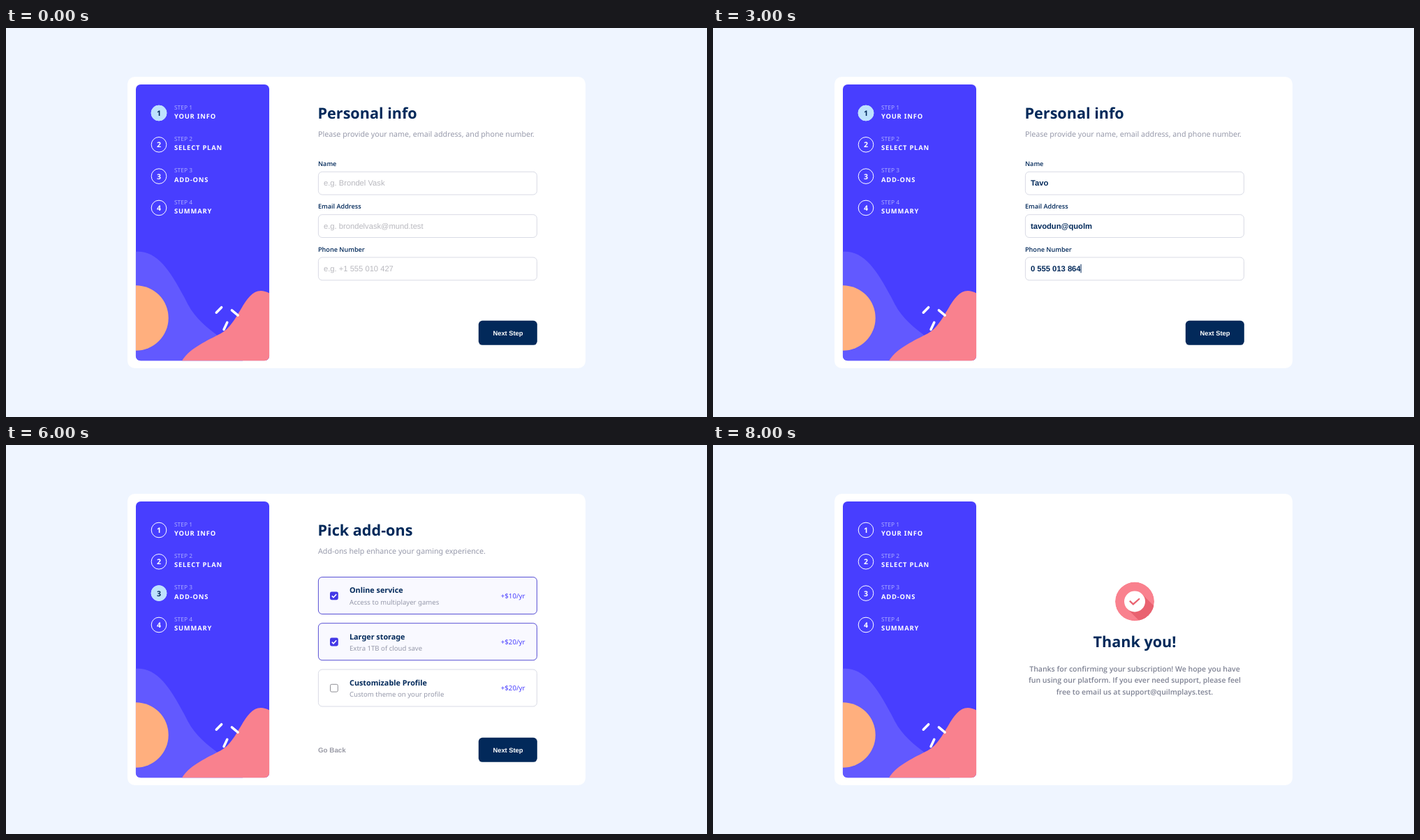
These frames come from a looping animation (1004x558 px, 9 s). An HTML page:

```html
<!DOCTYPE html>
<html lang="en">
<head>
<meta charset="utf-8">
<title>Multi-step form</title>
<style>
  :root {
    --navy: #02295a; --violet: #483eff; --gray: #9699aa;
    --line: #d9dbe5; --pale: #f9f9ff; --pink: #f9818e; --orange: #ffaf7e;
  }
  html, body { margin: 0; width: 100%; height: 100%; overflow: hidden; background: #eff5ff; }
  svg { display: block; width: 100%; height: 100%; }
  text {
    font-family: "Noto Sans", "Open Sans", sans-serif;
    fill: var(--navy); text-rendering: geometricPrecision; white-space: pre;
  }

  /* Each .show group is visible for 1 to 4 seconds from second --at */
  .show { visibility: hidden; animation: hold1 9s step-end calc((var(--at) - 9) * 1s) infinite; }
  .two { animation-name: hold2; }
  .three { animation-name: hold3; }
  .four { animation-name: hold4; }
  @keyframes hold1 { 0% { visibility: visible } 11.1111%, 100% { visibility: hidden } }
  @keyframes hold2 { 0% { visibility: visible } 22.2222%, 100% { visibility: hidden } }
  @keyframes hold3 { 0% { visibility: visible } 33.3333%, 100% { visibility: hidden } }
  @keyframes hold4 { 0% { visibility: visible } 44.4444%, 100% { visibility: hidden } }

  .title { font-size: 21.6px; font-weight: 700; }
  .lead { font-size: 10.7px; fill: var(--gray); }
  .label, .free, .thanks { font-family: "Open Sans", "Noto Sans", sans-serif; font-weight: 600; }
  .label { font-size: 9.1px; }
  .free { font-size: 8.75px; }
  .thanks { font-size: 10.5px; fill: #7f8394; }
  .name { font-size: 10.8px; font-weight: 600; }
  .note { font-size: 9.6px; fill: var(--gray); }
  .price { font-size: 9.7px; }
  .period { font-size: 9.6px; font-weight: 600; }
  .total { font-size: 12.4px; font-weight: 700; fill: var(--violet); }
  .field, .hint { font: 11.2px "Liberation Sans", Arial, sans-serif; }
  .field { font-weight: 700; }
  .hint { fill: #b8b8be; }
  .button { font: 700 9.33px "Liberation Sans", Arial, sans-serif; fill: #fff; }
  .back { font: 700 9.8px "Liberation Sans", Arial, sans-serif; fill: #9a9ba6; }
  .step { font-size: 8.4px; fill: #a9a9ff; }
  .caps { font-size: 9.4px; font-weight: 700; letter-spacing: .8px; fill: #fff; }
  .digit { font-size: 10.6px; font-weight: 700; fill: #fff; text-anchor: middle; }
  .active circle { fill: #bee2fd; }
  .active text { fill: var(--navy); }
  .end { text-anchor: end; }
  .mid { text-anchor: middle; }
  .gray { fill: var(--gray); }
  .violet { fill: var(--violet); }
  .box { fill: #fff; stroke: var(--line); }
  .picked { fill: var(--pale); stroke: var(--navy); }
  .checked { fill: var(--pale); stroke: #5850d4; }
  .caret { stroke: var(--navy); }
</style>
</head>
<body>
<svg viewBox="0 0 1004 558" preserveAspectRatio="none">
  <defs>
    <clipPath id="panel"><rect width="274" height="568" rx="10"/></clipPath>
    <clipPath id="badge"><circle cx="604" cy="224.5" r="28"/></clipPath>
    <rect id="input" x="447.4" y="206.3" width="313" height="32.8" rx="5.5"/>
    <rect id="tall" x="447.3" y="189.5" width="93" height="117.8" rx="5.5"/>
    <rect id="short" x="447.3" y="189.5" width="93" height="104" rx="5.5"/>
    <rect id="addon" x="447.4" y="189.5" width="313" height="53" rx="5.5"/>
    <g id="tick">
      <rect x="464" y="210.4" width="11.8" height="11.8" rx="2.4" fill="#4338e6"/>
      <path d="M466.8 216.4l2.2 2.3 4.2-4.6" fill="none" stroke="#fff" stroke-width="1.6"/>
    </g>
    <g id="icons" fill="#fff">
      <circle cx="470" cy="215" r="14" fill="var(--orange)"/>
      <rect x="465.2" y="214.3" width="9.6" height="7.8" rx="1"/>
      <path d="M470 210v8" stroke="var(--orange)" stroke-width="3.4"/>
      <path d="M470 210v7.6" stroke="#fff" stroke-width="1.6"/>
      <circle cx="470" cy="210.2" r="2.4"/>
      <circle cx="580" cy="215" r="14" fill="var(--pink)"/>
      <rect x="573" y="210.8" width="14" height="8.2" rx="4.1"/>
      <path d="M575 215h3.4M576.7 213.3v3.4M580 211v8" stroke="var(--pink)" stroke-width=".9"/>
      <circle cx="583.5" cy="215" r="1.7" fill="var(--pink)"/>
      <circle cx="690" cy="215" r="14" fill="var(--violet)"/>
      <path d="M685.6 209.8h8.8q1.8 0 2.2 2l.7 6q.1 2.4-1.6 2.4-1.2 0-3.6-3.2h-4.2q-2.4 3.2-3.6 3.2-1.7 0-1.6-2.4l.7-6q.4-2 2.2-2z"/>
      <path d="M685.4 213.3h3.4M687.1 211.6v3.4" stroke="var(--violet)" stroke-width=".9"/>
      <circle cx="693.2" cy="213.3" r="1.6" fill="var(--violet)"/>
    </g>
    <g id="plans">
      <text class="name" x="456" y="264.5">Arcade</text>
      <text class="name" x="566" y="264.5">Advanced</text>
      <text class="name" x="676" y="264.5">Pro</text>
    </g>
    <g id="toggle">
      <rect x="447" y="334" width="314" height="31.5" rx="4" fill="var(--pale)"/>
      <rect x="592" y="341" width="34" height="16.8" rx="8.4" fill="var(--navy)"/>
    </g>
    <g id="next">
      <rect x="676.8" y="419.8" width="84" height="35" rx="5.5" fill="var(--navy)"/>
      <text class="button mid" x="719" y="440.8">Next Step</text>
    </g>
  </defs>

  <rect x="174" y="70" width="656" height="418" rx="10.5" fill="#fff"/>

  <g transform="translate(185.9 80.9) scale(.698)" clip-path="url(#panel)">
    <rect width="274" height="568" fill="var(--violet)"/>
    <path d="M-17 347C38.6 330 68.6 377 107 452C146 527 255 540 212 612H-17Z" fill="#6259ff"/>
    <circle cy="480" r="67" fill="var(--orange)"/>
    <path d="M275 429.6C224 401.6 217.6 489.7 173.7 512.2C130 534.7 70.5 560.7 95.4 611H275Z" fill="var(--pink)"/>
    <path d="M165.3 469l10.6-10.8M209.5 474.6L197 464.1M187.6 489l-6.9 14.8" stroke="#fff" stroke-width="5" stroke-linecap="round"/>
  </g>

  <g fill="none" stroke="#fff">
    <circle cx="219" cy="122" r="10.8"/>
    <circle cx="219" cy="167.3" r="10.8"/>
    <circle cx="219" cy="212.6" r="10.8"/>
    <circle cx="219" cy="258" r="10.8"/>
  </g>
  <text class="digit" x="219" y="126">1</text>
  <text class="digit" x="219" y="171.3">2</text>
  <text class="digit" x="219" y="216.6">3</text>
  <text class="digit" x="219" y="262">4</text>
  <text class="step" x="241" y="116.5">STEP 1</text>
  <text class="caps" x="241" y="129.9">YOUR INFO</text>
  <text class="step" x="241" y="161.9">STEP 2</text>
  <text class="caps" x="241" y="175.2">SELECT PLAN</text>
  <text class="step" x="241" y="207.2">STEP 3</text>
  <text class="caps" x="241" y="220.5">ADD-ONS</text>
  <text class="step" x="241" y="252.6">STEP 4</text>
  <text class="caps" x="241" y="265.9">SUMMARY</text>

  <g class="active">
    <g class="show four" style="--at:0"><circle cx="219" cy="122" r="11.3"/><text class="digit" x="219" y="126">1</text></g>
    <g class="show two" style="--at:4"><circle cx="219" cy="167.3" r="11.3"/><text class="digit" x="219" y="171.3">2</text></g>
    <g class="show" style="--at:6"><circle cx="219" cy="212.6" r="11.3"/><text class="digit" x="219" y="216.6">3</text></g>
    <g class="show" style="--at:7"><circle cx="219" cy="258" r="11.3"/><text class="digit" x="219" y="262">4</text></g>
  </g>

  <!-- Personal info -->
  <g class="show four" style="--at:0">
    <text class="title" x="446.5" y="129.5">Personal info</text>
    <text class="lead" x="447" y="156.2">Please provide your name, email address, and phone number.</text>
    <text class="label" x="447" y="198">Name</text>
    <text class="label" x="447" y="259.4">Email Address</text>
    <text class="label" x="447" y="320.8">Phone Number</text>
    <use href="#input" class="box"/>
    <use href="#input" class="box" y="61.4"/>
    <use href="#input" class="box" y="122.7"/>
  </g>
  <text class="hint show" style="--at:0" x="455" y="226.3">e.g. Brondel Vask</text>
  <text class="hint show two" style="--at:0" x="455" y="287.6">e.g. brondelvask@mund.test</text>
  <text class="hint show three" style="--at:0" x="455" y="349">e.g. +1 555 010 427</text>
  <text class="field show three" style="--at:1" x="455" y="226.3">Tavo</text>
  <text class="field show two" style="--at:2" x="455" y="287.6">tavodun@quolm</text>
  <text class="field show" style="--at:3" x="455" y="349">0 555 013 864</text>
  <path class="caret show" style="--at:1" d="M482 216v12.5"/>
  <path class="caret show" style="--at:2" d="M543.5 277.4v12.5"/>
  <path class="caret show" style="--at:3" d="M527 338.8v12.5"/>

  <!-- Plan -->
  <g class="show two" style="--at:4">
    <text class="title" x="446.5" y="129.5">Select your plan</text>
    <text class="lead" x="447" y="156.2">You have the option of monthly or yearly billing.</text>
  </g>
  <g class="show" style="--at:4">
    <use href="#short" class="picked"/>
    <use href="#short" class="box" x="110"/>
    <use href="#short" class="box" x="220"/>
    <use href="#icons"/>
    <use href="#plans"/>
    <text class="price gray" x="456" y="278.5">$9/mo</text>
    <text class="price gray" x="566" y="278.5">$12/mo</text>
    <text class="price gray" x="676" y="278.5">$15/mo</text>
    <g transform="translate(0 -14)">
      <use href="#toggle"/>
      <circle cx="599.8" cy="349.4" r="5.8" fill="#fff"/>
      <text class="period" x="536" y="353">Monthly</text>
      <text class="period gray" x="642" y="353">Yearly</text>
    </g>
  </g>
  <g class="show" style="--at:5">
    <use href="#tall" class="picked"/>
    <use href="#tall" class="box" x="110"/>
    <use href="#tall" class="box" x="220"/>
    <use href="#icons"/>
    <use href="#plans"/>
    <text class="price gray" x="456" y="278.5">$90/yr</text>
    <text class="price gray" x="566" y="278.5">$120/yr</text>
    <text class="price gray" x="676" y="278.5">$150/yr</text>
    <text class="free" x="456" y="291.5">2 months free</text>
    <text class="free" x="566" y="291.5">2 months free</text>
    <text class="free" x="676" y="291.5">2 months free</text>
    <use href="#toggle"/>
    <circle cx="618.3" cy="349.4" r="5.8" fill="#fff"/>
    <text class="period gray" x="536" y="353">Monthly</text>
    <text class="period" x="642" y="353">Yearly</text>
  </g>

  <!-- Add-ons -->
  <g class="show" style="--at:6">
    <text class="title" x="446.5" y="129.5">Pick add-ons</text>
    <text class="lead" x="447" y="156.2">Add-ons help enhance your gaming experience.</text>
    <use href="#addon" class="checked"/>
    <use href="#addon" class="checked" y="66.2"/>
    <use href="#addon" class="box" y="132.5"/>
    <use href="#tick"/>
    <use href="#tick" y="66.2"/>
    <rect x="464.5" y="343.3" width="10.8" height="10.8" rx="2" fill="#fff" stroke="#8e8e94"/>
    <text class="name" x="492" y="212.3">Online service</text>
    <text class="note" x="492" y="229">Access to multiplayer games</text>
    <text class="price violet end" x="743.5" y="219.6">+$10/yr</text>
    <text class="name" x="492" y="278.5">Larger storage</text>
    <text class="note" x="492" y="295.2">Extra 1TB of cloud save</text>
    <text class="price violet end" x="743.5" y="285.8">+$20/yr</text>
    <text class="name" x="492" y="344.8">Customizable Profile</text>
    <text class="note" x="492" y="361.4">Custom theme on your profile</text>
    <text class="price violet end" x="743.5" y="352.1">+$20/yr</text>
  </g>

  <!-- Summary -->
  <g class="show" style="--at:7">
    <text class="title" x="446.5" y="129.5">Finishing up</text>
    <text class="lead" x="447" y="156.2">Double-check everything looks OK before confirming.</text>
    <rect x="447" y="189.5" width="314" height="128.5" rx="5.5" fill="var(--pale)"/>
    <text class="name" x="463.7" y="213.5">Arcade (Yearly)</text>
    <text class="note" x="463.7" y="226.2" text-decoration="underline">Change</text>
    <text class="name end" x="744" y="220">$90/yr</text>
    <path d="M464 245h280" stroke="#d6d8e2"/>
    <text class="note" x="463.7" y="271.5">Online service</text>
    <text class="price end" x="744" y="271.5">+$10/yr</text>
    <text class="note" x="463.7" y="299.4">Larger storage</text>
    <text class="price end" x="744" y="299.4">+$20/yr</text>
    <text class="note" x="463.7" y="337.7">Total (per year)</text>
    <text class="total end" x="744" y="338.5">$120/yr</text>
  </g>

  <!-- Thanks -->
  <g class="show" style="--at:8">
    <g clip-path="url(#badge)">
      <circle cx="604" cy="224.5" r="28" fill="var(--pink)"/>
      <path d="M614.6 213.9l40 40-21.2 21.2-40-40z" fill="#e96270"/>
    </g>
    <circle cx="604" cy="224.5" r="15" fill="#fff"/>
    <path d="M596.8 223.6l5 4.8 9.2-8.2" fill="none" stroke="#e96270" stroke-width="2.2"/>
    <text class="title mid" x="604" y="290">Thank you!</text>
    <text class="thanks mid" x="604" y="324.5">Thanks for confirming your subscription! We hope you have</text>
    <text class="thanks mid" x="604" y="341.2">fun using our platform. If you ever need support, please feel</text>
    <text class="thanks mid" x="604" y="357.9">free to email us at support@quilmplays.test.</text>
  </g>

  <!-- Navigation -->
  <text class="back show four" style="--at:4" x="447" y="440.9">Go Back</text>
  <use href="#next" class="show four" style="--at:0"/>
  <use href="#next" class="show four" style="--at:4"/>
</svg>
</body>
</html>
```
